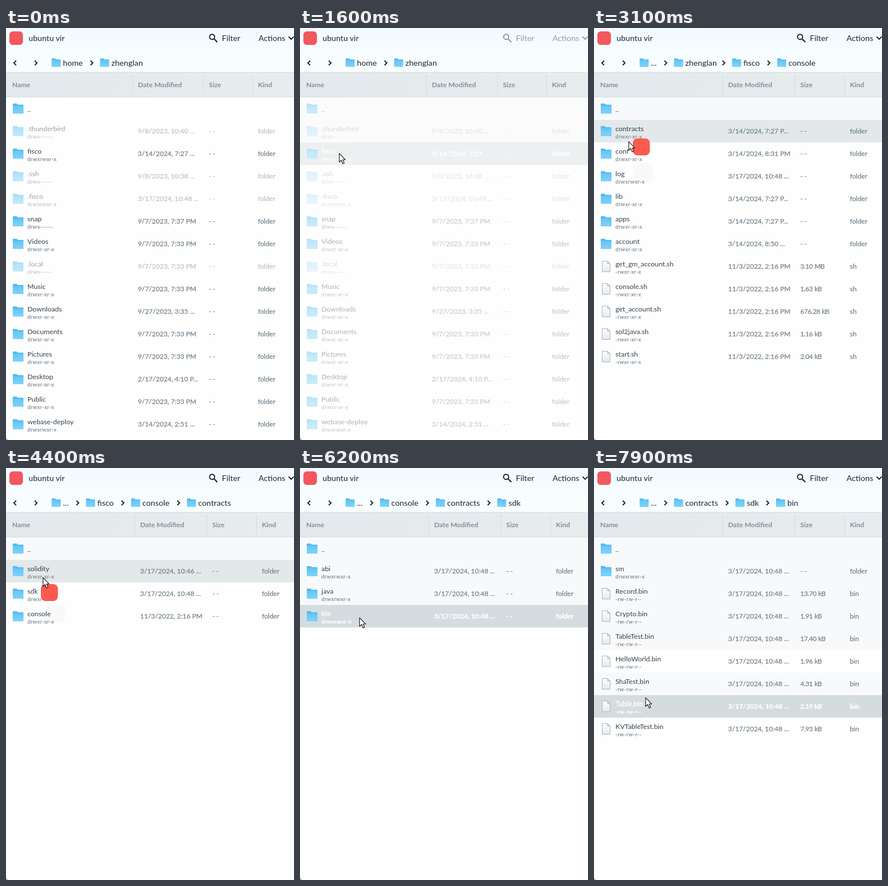
Recreate the animation shown at these times as an HTML page. Size 511 by 731 pixels, loop 8 s.

```html
<!DOCTYPE html>
<html lang="en">
<head>
<meta charset="utf-8">
<title>File browser</title>
<style>
html, body { margin: 0; width: 100%; height: 100%; overflow: hidden; background: #fefefe; }
#stage { position: relative; width: 511px; height: 731px; overflow: hidden; background: #fefefe;
  font-family: Lato, "Open Sans", sans-serif; color: #1c2733; }
#stage * { position: absolute; }
#stage span { white-space: pre; line-height: 20px; }
#bar { left: 0; top: 0; width: 511px; height: 78px; background: linear-gradient(#f1fafe, #f7fdff 60%, #f9fdfe); }
#logo { left: 6px; top: 6px; width: 24px; height: 24px; border-radius: 6px; background: #f4575e; }
#corner { left: 0; top: 727px; width: 4px; height: 4px;
  background: radial-gradient(circle at 4px 0, transparent 3.4px, #8d969b 4px); }
.big { font-size: 14.3px; }
.screen { left: 0; top: 0; width: 511px; height: 731px; visibility: hidden; }
.screen.on { visibility: visible; }
.head { left: 0; top: 78px; width: 511px; height: 43px; background: linear-gradient(90deg, #e3e9ec, #e7ecee);
  border: solid #d6dee1; border-width: 1px 0; }
.head span { font-size: 12.2px; font-weight: 700; color: #82909a; }
.head i { top: 4px; width: 1px; height: 36px; background: #d3dce0; }
.list { left: 0; top: 123px; width: 511px; height: 608px; }
.row { left: 0; width: 511px; height: 40px; }
.row.tint { background: #f8f9fa; }
.row.hover { background: #e3e8ea; }
.row.picked { background: #d5dcdf; }
.row.faint > * { opacity: .48; }
.name { font-size: 12.35px; color: #35424e; }
.perm, .cell { -webkit-text-stroke: .25px currentColor; }
.perm { font-size: 9.4px; letter-spacing: .45px; color: #86929a; }
.cell { font-size: 12px; color: #74838d; }
.size { letter-spacing: -.45px; word-spacing: .6px; }
.row.picked span { color: #fff; font-weight: 700; }
#trace { left: 69px; top: 239px; width: 36px; height: 35px; border-radius: 9px; background: #f9f9f9; }
#popup { left: 0; top: 0; width: 30px; height: 30px; border-radius: 8px; background: #fb5b4e; }
</style>
</head>
<body>
<div id="stage">
  <svg width="0" height="0">
    <defs>
      <linearGradient id="blue" x2="0" y2="1"><stop stop-color="#62c6f6"/><stop offset="1" stop-color="#7fd3fa"/></linearGradient>
      <linearGradient id="paper" x2="0" y2="1"><stop stop-color="#fff"/><stop offset="1" stop-color="#e3e9ea"/></linearGradient>
    </defs>
    <symbol id="folder" viewBox="0 0 19 18">
      <path d="M0 1Q0 0 1 0H7L9 2H18Q19 2 19 3V17Q19 18 18 18H1Q0 18 0 17Z" fill="#57baf0"/>
      <path d="M0 4H19V17Q19 18 18 18H1Q0 18 0 17Z" fill="url(#blue)"/>
    </symbol>
    <symbol id="file" viewBox="0 0 15 20">
      <path d="M.5 .5H10L14.5 5V19.5H.5Z" fill="url(#paper)" stroke="#a9b5ba"/>
      <path d="M10 .5V5H14.5Z" fill="#d8e0e3" stroke="#a9b5ba" stroke-linejoin="round"/>
    </symbol>
    <symbol id="chevron" viewBox="0 0 8 12">
      <path d="M2 2L6 6L2 10" fill="none" stroke="#17212b" stroke-width="1.9"/>
    </symbol>
  </svg>
  <div id="bar"></div>
  <div id="logo"></div>
  <div id="tools">
    <svg style="left:359px;top:9px" width="18" height="18" fill="none" stroke="#17212b">
      <circle cx="6.7" cy="6.7" r="4.5" stroke-width="1.9"/><path d="M10 10L16 16" stroke-width="2.2"/>
    </svg>
    <svg style="left:500px;top:13px" width="11" height="10" fill="none" stroke="#17212b" stroke-width="1.9">
      <path d="M1.5 2.5L6 7L10.5 2.5"/>
    </svg>
  </div>
  <div id="trace"></div>
  <div id="screens"></div>
  <div id="corner"></div>
  <div id="popup"></div>
  <svg id="cursor" style="left:0;top:0" width="14" height="21">
    <path d="M.7 .7V16L4.3 12.7L6.9 18.8L9.5 17.7L7 11.8H11.6Z" fill="#fff" stroke="#111" stroke-width="1.1" stroke-linejoin="round"/>
  </svg>
</div>
<script>
const $ = id => document.getElementById(id);

// Crumbs are [folder x, name]; rows are name|permissions|date|size|kind.
const screens = [
  { cols: [224, 350, 437], crumbs: [[81, 'home'], [167, 'zhenglan']], rows: `
.thunderbird|drwx------|9/8/2023, 10:40 ...
fisco|drwxrwxr-x|3/14/2024, 7:27 ...
.ssh|drwx------|9/8/2023, 10:38 ...
.fisco|drwxrwxr-x|3/17/2024, 10:48 ...
snap|drwx------|9/7/2023, 7:37 PM
Videos|drwxr-xr-x|9/7/2023, 7:33 PM
.local|drwx------|9/7/2023, 7:33 PM
Music|drwxr-xr-x|9/7/2023, 7:33 PM
Downloads|drwxr-xr-x|9/27/2023, 3:35 ...
Documents|drwxr-xr-x|9/7/2023, 7:33 PM
Pictures|drwxr-xr-x|9/7/2023, 7:33 PM
Desktop|drwxr-xr-x|2/17/2024, 4:10 P...
Public|drwxr-xr-x|9/7/2023, 7:33 PM
webase-deploy|drwxrwxr-x|3/14/2024, 2:51 ...` },
  { crumbs: [[81, 'home'], [167, 'zhenglan'], [270, 'fisco']], rows: `
console|drwxr-xr-x|3/14/2024, 8:50 ...
download_console.sh|-rw-rw-r--|3/14/2024, 7:26 ...|3.58 kB|sh
console.tar.gz|-rw-rw-r--|3/14/2024, 7:27 P...|48.10 MB|gz` },
  { crumbs: [[81, '...'], [142, 'zhenglan'], [245, 'fisco'], [325, 'console']], rows: `
contracts|drwxr-xr-x|3/14/2024, 7:27 P...
conf|drwxr-xr-x|3/14/2024, 8:31 PM
log|drwxrwxr-x|3/17/2024, 10:48 ...
lib|drwxr-xr-x|3/14/2024, 7:27 P...
apps|drwxr-xr-x|3/14/2024, 7:27 P...
account|drwxr-xr-x|3/14/2024, 8:50 ...
get_gm_account.sh|-rwxr-xr-x|11/3/2022, 2:16 PM|3.10 MB|sh
console.sh|-rwxr-xr-x|11/3/2022, 2:16 PM|1.63 kB|sh
get_account.sh|-rwxr-xr-x|11/3/2022, 2:16 PM|676.28 kB|sh
sol2java.sh|-rwxr-xr-x|11/3/2022, 2:16 PM|1.16 kB|sh
start.sh|-rwxr-xr-x|11/3/2022, 2:16 PM|2.04 kB|sh` },
  { crumbs: [[81, '...'], [142, 'fisco'], [222, 'console'], [321, 'contracts']], rows: `
solidity|drwxr-xr-x|3/17/2024, 10:46 ...
sdk|drwxr-xr-x|3/17/2024, 10:48 ...
console|drwxr-xr-x|11/3/2022, 2:16 PM` },
  { crumbs: [[81, '...'], [142, 'console'], [241, 'contracts'], [350, 'sdk']], rows: `
abi|drwxrwxr-x|3/17/2024, 10:48 ...
java|drwxrwxr-x|3/17/2024, 10:48 ...
bin|drwxrwxr-x|3/17/2024, 10:48 ...` },
  { crumbs: [[81, '...'], [142, 'contracts'], [251, 'sdk'], [323, 'bin']], rows: `
sm|drwxrwxr-x|3/17/2024, 10:48 ...
Record.bin|-rw-rw-r--|3/17/2024, 10:48 ...|13.70 kB|bin
Crypto.bin|-rw-rw-r--|3/17/2024, 10:48 ...|1.91 kB|bin
TableTest.bin|-rw-rw-r--|3/17/2024, 10:48 ...|17.40 kB|bin
HelloWorld.bin|-rw-rw-r--|3/17/2024, 10:48 ...|1.96 kB|bin
ShaTest.bin|-rw-rw-r--|3/17/2024, 10:48 ...|4.31 kB|bin
Table.bin|-rw-rw-r--|3/17/2024, 10:48 ...|2.19 kB|bin
KVTableTest.bin|-rw-rw-r--|3/17/2024, 10:48 ...|7.93 kB|bin` }
];

// Times in units of 100 ms.
const loads = [15, 26, 41, 50, 64];
const picks = [[13, 17], [25, 28], [39, 43], [49, 52], [62, 66], [79, 80]];
const popups = [[19, 21, 73, 239], [30, 33, 69, 196], [44, 46, 62, 206], [54, 56, 72, 239], [69, 71, 109, 282]];
const path = [
  [1, 325, 90], [2, 291, 142], [3, 215, 172], [4, 140, 196], [5, 95, 212], [6, 69, 222],
  [23, 66, 178], [24, 66, 179], [31, 61, 201], [32, 60, 206], [33, 59, 212],
  [36, 59, 205], [37, 59, 198], [38, 59, 190], [44, 65, 194], [45, 66, 198], [46, 66, 206],
  [47, 67, 213], [48, 67, 220], [49, 68, 222], [55, 80, 228], [56, 88, 240], [57, 94, 252], [58, 100, 262],
  [59, 102, 268], [60, 104, 273], [61, 105, 270], [62, 105, 265], [72, 105, 267],
  [73, 102, 280], [74, 98, 300], [75, 94, 322], [76, 92, 345], [77, 92, 368], [78, 91, 392], [79, 91, 407]
];
// [screen, row, start]
const tints = [[0, 1, 5], [4, 1, 0], [4, 2, 0], [5, 1, 0], [5, 2, 0], [5, 3, 0], [5, 4, 75], [5, 6, 79]];

function box(parent, cls, tag = 'div') {
  const el = document.createElement(tag);
  el.className = cls;
  parent.append(el);
  return el;
}
function label(parent, cls, x, mid, text) {
  const el = box(parent, cls, 'span');
  el.style.left = x + 'px';
  el.style.top = mid - 10 + 'px';
  el.textContent = text;
}
function icon(parent, id, x, y, w, h, flip = '') {
  parent.insertAdjacentHTML('beforeend',
    `<svg style="left:${x}px;top:${y}px;${flip && 'transform:scaleX(-1)'}" width="${w}" height="${h}"><use href="#${id}"/></svg>`);
}

function buildRow(list, cols, line, i) {
  const [name, perm, date, size = '- -', kind = 'folder'] = line.split('|');
  const row = box(list, 'row');
  row.style.top = i * 40 + 'px';
  if (kind === 'folder') icon(row, 'folder', 12, 11, 19, 18);
  else icon(row, 'file', 14, 10, 15, 20);
  if (!perm) {
    label(row, 'name', 38, 21.5, name);
    return row;
  }
  row.classList.toggle('faint', name[0] === '.');
  label(row, 'name', 38, 15.5, name);
  label(row, 'perm', 38, 29.5, perm);
  label(row, 'cell', cols[0] + 10, 19.8, date);
  label(row, 'cell size', cols[1] + 10, 19.8, size);
  label(row, 'cell', cols[2] + 10, 19.8, kind);
  return row;
}

for (const s of screens) {
  const cols = s.cols || [228, 356, 444];
  s.el = box($('screens'), 'screen');
  s.crumbs.forEach(([x, name], i) => {
    if (i) icon(s.el, 'chevron', x - 19, 56, 8, 12);
    icon(s.el, 'folder', x, 54, 16, 15);
    label(s.el, 'big', x + 20, 61.5, name);
  });
  const head = box(s.el, 'head');
  label(head, '', 11, 21.5, 'Name');
  ['Date Modified', 'Size', 'Kind'].forEach((text, c) => {
    box(head, '', 'i').style.left = cols[c] + 'px';
    label(head, '', cols[c] + 10, 21.5, text);
  });
  s.list = box(s.el, 'list');
  s.items = ['..', ...s.rows.trim().split('\n')].map((line, i) => buildRow(s.list, cols, line, i));
}
icon($('bar'), 'chevron', 12, 56, 8, 12, 'flip');
icon($('bar'), 'chevron', 49, 56, 8, 12);
label($('bar'), 'big', 40, 17.5, 'ubuntu vir');
label($('tools'), 'big', 383, 17.5, 'Filter');
label($('tools'), 'big', 448, 17.5, 'Actions');

function place(id, visible, x, y) {
  $(id).style.visibility = visible ? 'visible' : 'hidden';
  if (visible) $(id).style.transform = `translate(${x}px,${y}px)`;
}

function show(t) {
  const within = ([from, to]) => t >= from && t < to;
  const index = loads.filter(at => t >= at + 2).length;
  const step = loads.map(at => t - at).find(d => d >= 0 && d < 3);
  const dim = step !== undefined;
  const pos = path.filter(p => p[0] <= t).pop();
  const hover = pos ? Math.floor((pos[2] - 123) / 40) : -1;
  const picked = picks.some(within);
  const popup = popups.find(within);

  screens.forEach((s, i) => s.el.classList.toggle('on', i === index));
  const current = screens[index];
  current.list.style.opacity = dim ? [.8, .4, .5][step] : 1;
  $('tools').style.opacity = dim && t < 64 ? .45 : 1;
  current.items.forEach((row, i) => {
    const tinted = i === 0 ? t >= 3 : tints.some(([s, r, at]) => s === index && r === i && t >= at);
    row.classList.toggle('tint', tinted);
    row.classList.toggle('hover', i === hover);
    row.classList.toggle('picked', i === hover && picked);
  });

  place('trace', within([21, 50]), 0, 0);
  place('popup', popup, popup?.[2], popup?.[3]);
  place('cursor', pos, pos?.[1], pos?.[2]);
}

const start = performance.now();
function tick() {
  show(Math.floor((performance.now() - start) % 8000 / 100));
  requestAnimationFrame(tick);
}
tick();
</script>
</body>
</html>
```
